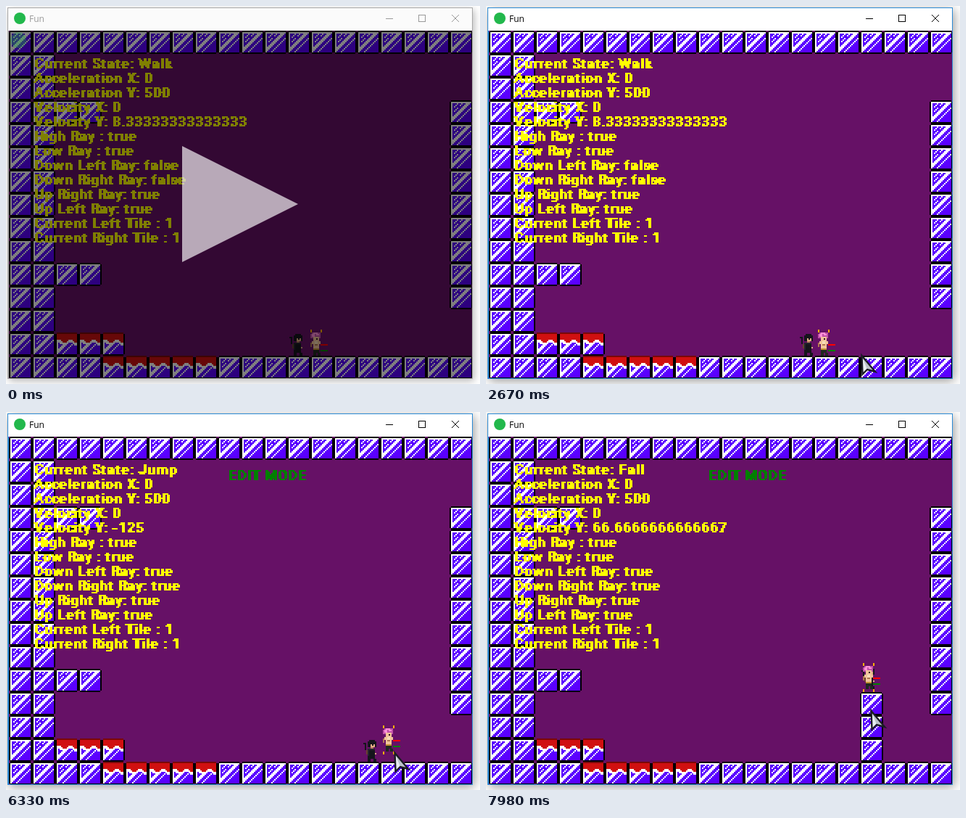
Animation, 654 px wide and 521 px high, one loop 8 s. Source, as an HTML page with a canvas:

```html
<!DOCTYPE html>
<html lang="en">
<head>
<meta charset="utf-8">
<title>Fun</title>
<style>
html, body { margin: 0; width: 100%; height: 100%; overflow: hidden; background: #fff; }
canvas { display: block; }
</style>
</head>
<body>
<canvas id="stage" width="654" height="521"></canvas>
<script>
const LOOP = 8000, STEP = 30, FOCUS = 720, EDIT = 3570;
const ctx = document.getElementById('stage').getContext('2d');
const OX = 4, OY = 34, VIEW_W = 639, VIEW_H = 479, TILE = 32, FLOOR = 482;

function makeCanvas(w, h) {
  const c = document.createElement('canvas');
  c.width = w;
  c.height = h;
  return c;
}

function rect(g, color, x, y, w, h) {
  g.fillStyle = color;
  g.fillRect(x, y, w, h);
}

// Tiles: 16 x 16 units, shown at double size
function makeTile(lava) {
  const c = makeCanvas(16, 16), g = c.getContext('2d');
  rect(g, '#000', 0, 1, 16, 14);
  rect(g, '#000', 1, 0, 14, 16);
  rect(g, '#fff', 1, 1, 14, 14);
  for (let y = 1; y < 14; y++) {
    for (let x = 1; x < 14; x++) {
      const s = x + y;
      const dash = (s === 5 || s === 8) && x % 4 !== 1;
      const band = (s > 10 && s < 14) || s === 17;
      if (!dash && !band) rect(g, '#5a00ff', x + 1, y + 1, 1, 1);
    }
  }
  if (lava) {
    for (let x = 1; x < 15; x++) {
      const depth = 5 + Math.round(1.5 * Math.sin(x * 0.8 + 3));
      rect(g, '#fff', x, depth + 1, 1, 2);
      rect(g, '#d01010', x, 1, 1, depth);
    }
    rect(g, '#7a0808', 1, 0, 14, 1);
  }
  return c;
}

const plainTile = makeTile(false), lavaTile = makeTile(true);

function tiles(col, row, cols, rows, img = plainTile) {
  for (let c = col; c < col + cols; c++) {
    for (let r = row; r < row + rows; r++) {
      ctx.drawImage(img, OX + c * TILE, OY + r * TILE, TILE, TILE);
    }
  }
}

function drawMap(t) {
  tiles(0, 0, 20, 1);
  tiles(0, 1, 2, 13);
  tiles(2, 3, 2, 1);
  tiles(2, 10, 2, 1);
  tiles(19, 3, 1, 9);
  tiles(2, 13, 3, 1, lavaTile);
  tiles(0, 14, 4, 1);
  tiles(4, 14, 5, 1, lavaTile);
  tiles(9, 14, 11, 1);
  [6650, 7250, 7890].forEach((start, i) => {
    if (t >= start) tiles(16, 13 - i, 1, 1);
  });
}

// Pixel text: small glyphs with widened stems and hard edges, at double size
const textCache = new Map();

function makeText(str, color) {
  const w = 200, h = 14, c = makeCanvas(w, h);
  const g = c.getContext('2d', { willReadFrequently: true });
  g.font = '500 9.8px Roboto, sans-serif';
  let x = 0;
  for (const ch of str) {
    g.fillText(ch, x, 10);
    x += Math.round(g.measureText(ch).width + 0.3);
  }
  const ink = g.getImageData(0, 0, w, h).data;
  g.clearRect(0, 0, w, h);
  for (let i = 1; i < w * h; i++) {
    const cover = (ink[i * 4 + 3] + ink[i * 4 - 1]) / 510;
    if (cover > 0.27) rect(g, color, i % w, Math.floor(i / w), 1, 1);
  }
  return c;
}

function pixelText(str, x, baseline, color) {
  const key = color + str;
  if (!textCache.has(key)) textCache.set(key, makeText(str, color));
  ctx.drawImage(textCache.get(key), x, baseline - 20, 400, 28);
}

// Motion, in game units and seconds
const WALKS = [[1373, 0.48], [4710, 0.62]];
const JUMPS = [6280, 6883, 7547];
const PUSH = 100, DRAG = 160, GRAVITY = 500, LEAP = 150;

function walkState(t) {
  let x = 0, v = 0, a = 0;
  for (const [start, push] of WALKS) {
    const s = (t - start) / 1000;
    if (s < 0) continue;
    const p = Math.min(s, push), top = PUSH * push;
    x += PUSH * p * p / 2;
    if (s < push) {
      a = PUSH;
      v = PUSH * Math.round(s * 60) / 60;
    } else {
      const q = Math.min(s - push, top / DRAG);
      x += top * q - DRAG * q * q / 2;
      v = Math.max(0, top - DRAG * Math.round((s - push) * 60) / 60);
    }
  }
  return { x: 420 + 2 * Math.round(x), v, a };
}

function jumpState(t) {
  const i = JUMPS.findLastIndex(start => t >= start);
  const rest = { h: 0, v: GRAVITY / 60, air: false };
  if (i < 0) return rest;
  const s = (t - JUMPS[i]) / 1000, base = i * 16;
  const h = base + LEAP * s - GRAVITY * s * s / 2;
  if (s > LEAP / GRAVITY && h <= base + 16) return { ...rest, h: base + 16 };
  return { h, v: -LEAP + GRAVITY * Math.round(s * 60) / 60, air: true };
}

function follow(keys, t) {
  if (t <= keys[0][0]) return keys[0].slice(1);
  for (let i = 1; i < keys.length; i++) {
    const a = keys[i - 1], b = keys[i];
    if (t < b[0]) {
      const p = (t - a[0]) / (b[0] - a[0]), e = p * p * (3 - 2 * p);
      return a.slice(1).map((n, k) => n + (b[k + 1] - n) * e);
    }
  }
  return keys[keys.length - 1].slice(1);
}

const POINTER = [
  [720, 535, 515], [870, 543, 432], [2160, 543, 432], [2370, 586, 456],
  [2670, 517, 480], [2940, 517, 472], [3570, 517, 472], [3900, 537, 466],
  [4320, 519, 465], [4380, 519, 465], [4530, 523, 468], [5520, 523, 468],
  [5880, 557, 452], [6330, 535, 468], [6650, 531, 460], [7050, 521, 440],
  [7250, 525, 434], [7600, 534, 424], [7890, 530, 410]
];
const GAP = [[1740, -29], [2130, -25], [5000, -25], [6330, -27], [7050, -11], [7900, -2]];

// Sprites: o is a unit-sized painter anchored at the top left
function painter(left, top) {
  return (color, x, y, w, h) => rect(ctx, color, left + 2 * x, top + 2 * y, 2 * w, 2 * h);
}

function drawHero(x, feet, air, stride) {
  const o = painter(x, feet - 36);
  const pink = '#ff8fd8', skin = '#f2c49a', dark = '#202820';
  o('#c050a8', 1, 2, 6, 1);
  o('#c050a8', 0, 3, 7, 3);
  o(pink, 2, 2, 3, 1);
  o(pink, 1, 3, 2, 2);
  o(pink, 4, 3, 2, 1);
  o(skin, 2, 5, 4, 3);
  o('#301820', 4, 6, 1, 1);
  o(skin, 1, 8, 6, 2);
  o(skin, 2, 10, 4, 3);
  o('#b07850', 0, 9, 1, 3);
  o('#b07850', 3, 10, 2, 1);
  o('#f7dcb8', 3, 8, 2, 2);
  o('#c09030', 2, 13, 4, 1);
  o(dark, 2, 14, 4, 2);
  o(dark, stride ? 1 : 2, 16, 2, 2);
  o(dark, stride ? 6 : 5, 16, 2, 2);
  for (const side of [0, 7]) {
    o('#ffb000', side, 0, 1, 2);
    if (air) o('#ffb000', side, 18, 1, 2);
  }
  rect(ctx, '#ff0000', x + 14, feet - 16, 10, 2);
  rect(ctx, '#008000', x + 14, feet - 8, 10, 2);
}

function drawNinja(x, feet, stride, dip) {
  const o = painter(x, feet - 30);
  const black = '#15151c', skin = '#e0ac84';
  o(black, 0, 2, 2, 1);
  o(black, 1, 3, 1, 4);
  o(black, 4, dip, 4, 1);
  o(black, 3, 1 + dip, 6, 4);
  o(skin, 5, 3 + dip, 3, 2);
  o(black, 6, 3 + dip, 1, 1);
  o('#b88060', 5, 5 + dip, 2, 1);
  o('#25252f', 3, 6 + dip, 5, 5);
  o(black, 4, 7 + dip, 4, 4);
  o('#6a4030', 2, 7 + dip, 1, 3);
  o(skin, 8, 9 + dip, 1, 1);
  o(black, 3, 11, 5, 2);
  o(black, stride ? 2 : 3, 13, 2, 2);
  o(black, stride ? 8 : 7, 13, 2, 2);
}

function drawPointer(x, y) {
  const tip = [1.5, 2], notch = [9, 21], wing = [20, 24], tail = [2.5, 27.5];
  const shape = (...pts) => {
    ctx.beginPath();
    pts.forEach(([px, py]) => ctx.lineTo(x + px, y + py));
    ctx.closePath();
  };
  shape(tip, tail, notch, wing);
  ctx.fillStyle = '#e9eef2';
  ctx.fill();
  shape(tip, notch, wing);
  ctx.fillStyle = '#bcc3ca';
  ctx.fill();
  shape(tip, tail, notch, wing);
  ctx.strokeStyle = '#1b1b25';
  ctx.lineWidth = 2.4;
  ctx.stroke();
}

function disc(x, y, r) {
  ctx.fillStyle = '#22b84c';
  ctx.beginPath();
  ctx.arc(x, y, r, 0, 7);
  ctx.fill();
}

function drawWindow(active) {
  rect(ctx, '#fff', 0, 0, 654, 521);
  ctx.save();
  ctx.shadowColor = active ? 'rgba(0,0,0,.4)' : 'rgba(0,0,0,.28)';
  ctx.shadowBlur = active ? 14 : 10;
  ctx.shadowOffsetX = 2;
  ctx.shadowOffsetY = 3;
  rect(ctx, active ? '#2b8ad6' : '#a8a8a8', 2, 2, 642, 512);
  ctx.restore();
  rect(ctx, active ? '#fff' : '#fbfbfb', 3, 3, 640, 31);
  disc(19, 17, 8);
  const ink = active ? '#000' : '#999';
  ctx.fillStyle = ink;
  ctx.font = '12px "Open Sans", sans-serif';
  ctx.fillText('Fun', 32, 22);
  ctx.strokeStyle = ink;
  ctx.lineWidth = 1;
  ctx.strokeRect(569.5, 12.5, 9, 9);
  ctx.beginPath();
  ctx.moveTo(524, 17.5);
  ctx.lineTo(534, 17.5);
  ctx.moveTo(615, 12);
  ctx.lineTo(625, 22);
  ctx.moveTo(625, 12);
  ctx.lineTo(615, 22);
  ctx.stroke();
}

function drawStatus(walk, jump) {
  const num = v => String(+v.toPrecision(15));
  const state = !jump.air ? 'Walk' : jump.v < 0 ? 'Jump' : 'Fall';
  [
    'Current State: ' + state,
    'Acceleration X: ' + walk.a,
    'Acceleration Y: ' + GRAVITY,
    'Velocity X: ' + num(walk.v),
    'Velocity Y: ' + num(jump.v),
    'High Ray : true',
    'Low Ray : true',
    'Down Left Ray: ' + jump.air,
    'Down Right Ray: ' + jump.air,
    'Up Right Ray: true',
    'Up Left Ray: true',
    'Current Left Tile : 1',
    'Current Right Tile : 1'
  ].forEach((line, i) => pixelText(line, 38, 86 + i * 20, 'yellow'));
}

function drawPause() {
  rect(ctx, 'rgba(0,0,0,.5)', OX, OY, VIEW_W, VIEW_H);
  ctx.fillStyle = 'rgba(255,255,255,.65)';
  ctx.beginPath();
  ctx.moveTo(243, 193);
  ctx.lineTo(403, 273);
  ctx.lineTo(243, 353);
  ctx.fill();
  ctx.globalAlpha = 0.35;
  disc(17, 47, 11);
  ctx.globalAlpha = 1;
}

function draw(t) {
  const active = t >= FOCUS;
  const walk = walkState(t), jump = jumpState(t);
  drawWindow(active);
  ctx.save();
  ctx.beginPath();
  ctx.rect(OX, OY, VIEW_W, VIEW_H);
  ctx.clip();
  ctx.imageSmoothingEnabled = false;
  rect(ctx, '#661166', OX, OY, VIEW_W, VIEW_H);

  const stride = walk.v > 0 && Math.floor(t / 120) % 2 === 1;
  const dip = (t >= 1020 && t < 1170) || (t >= 3090 && t < 3270) || (t >= 3420 && t < 4380) ? 1 : 0;
  const lag = Math.min(jump.h, jumpState(t - 150).h);
  const [gap] = follow(GAP, t);
  drawNinja(Math.round(walk.x + gap), FLOOR - 2 * Math.round(lag), stride, dip);
  drawHero(walk.x, FLOOR - 2 * Math.round(jump.h), jump.air, stride);
  drawMap(t);
  drawStatus(walk, jump);
  if (t >= EDIT) pixelText('EDIT MODE', 306, 94, 'green');
  if (active) {
    const [px, py] = follow(POINTER, t);
    drawPointer(Math.round(px), Math.round(py));
  } else {
    drawPause();
  }
  ctx.restore();
}

const begin = performance.now();

function frame() {
  const t = (performance.now() - begin) % LOOP;
  draw(Math.floor(t / STEP) * STEP);
  requestAnimationFrame(frame);
}

frame();
</script>
</body>
</html>
```
